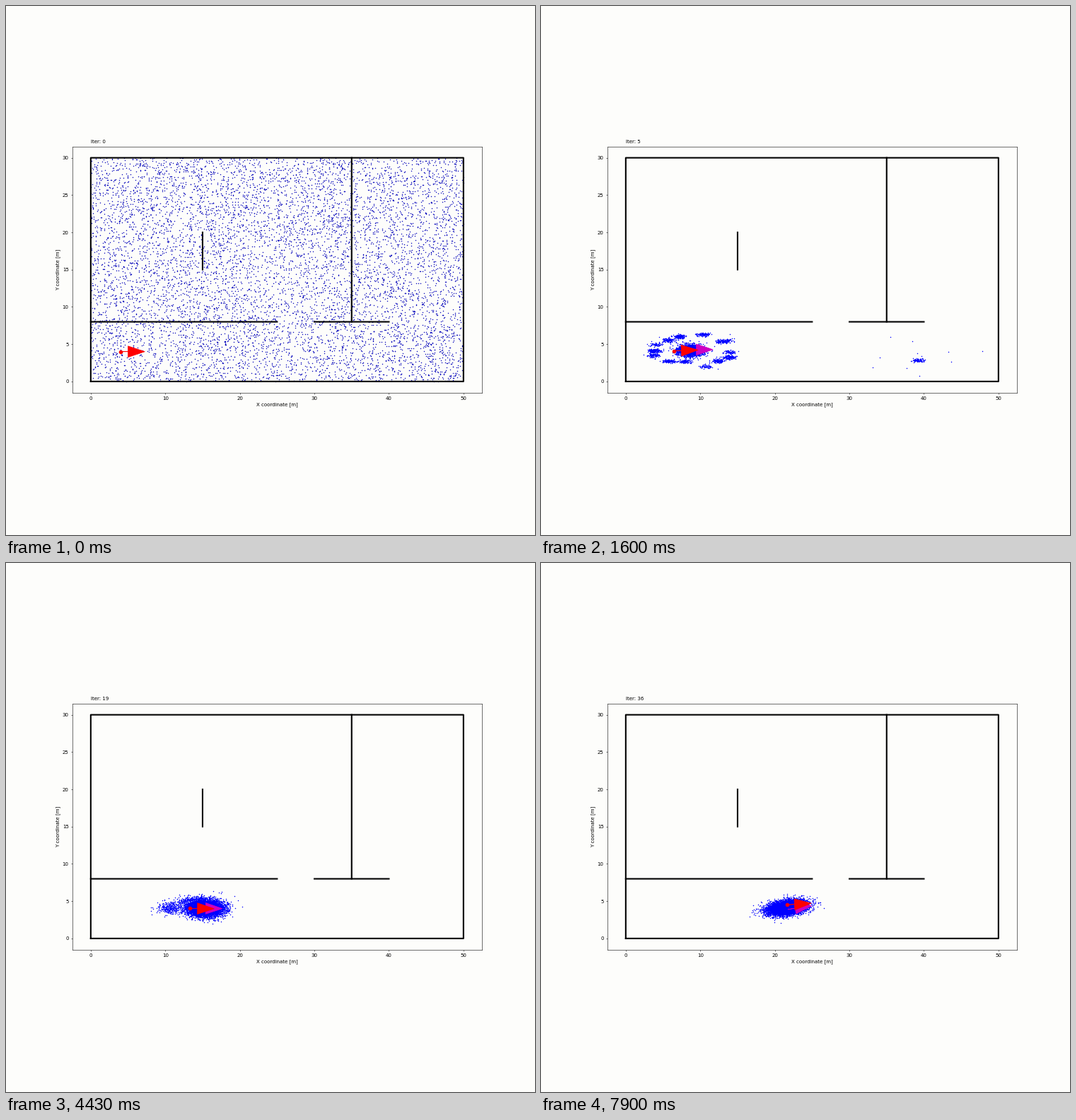
Recreate the animation shown at these times as a matplotlib script. Size 748 by 748 pixels, loop 8 s.

```python
import numpy as np
import matplotlib.pyplot as plt
from matplotlib.animation import FuncAnimation

SIZE, DPI = 748, 50
BG = "#fdfdfb"
STEP_MS, HOLD, STEPS = 200, 3, 40
LAST = STEPS - HOLD - 1
SPEED = .49
COUNT = 8500
RINGED = 14


def bell(v, mid, width):
    return np.exp(-((v - mid) / width) ** 2)


def inside(points):
    x, y = points.T
    return points[(x > .1) & (x < 49.9) & (y > .1) & (y < 29.9)]


def blob(rng, x, y, sx, sy, count):
    return rng.normal((x, y), (sx, sy), (max(int(count), 0), 2))


def robot(step):
    """Position and heading along a gently rising, swaying path."""
    w = 2 * np.pi / 30
    y = 4 + .4 * (step / LAST) ** 2 + .12 * np.sin(w * step)
    slope = (.8 * step / LAST ** 2 + .12 * w * np.cos(w * step)) / SPEED
    return 4 + SPEED * step, y, np.arctan(slope) if step else 0


def dip(step):
    return bell(step, 24, 4)


def cloud_center(step):
    lead = 2.2 - 2.3 * (step / LAST) ** 4
    return 4 + SPEED * step + lead, 4.15 - .45 * dip(step)


def guess(step):
    u = step / LAST
    lead = np.interp(step, [1, 5, 14, 24, 31, 36], [6.6, 2, .5, 1.7, 1.2, .1])
    y = cloud_center(step)[1] - .25 * u ** 4 + .9 * np.exp(-(step - 1) / 2)
    return 4 + SPEED * step + lead, y, .15 * u ** 3 - .15 * dip(step)


def likelihood(x, y):
    """How well a place fits the first measurement."""
    corridor = bell(y, 4.2, 2.7) * (1.3 * np.exp(-x / 12) + .7 * bell(x, 42, 5.5))
    left_room = .18 * np.exp(-x / 5)
    right_room = .45 * bell(x, 43.8, 3.5) * bell(y, 25.6, 3) + .02 * (x > 36)
    behind_wall = .12 * bell(x, 32.5, 1.8)
    return np.where(y < 7.7, corridor, left_room + right_room + behind_wall) + .005


def start_cloud():
    return np.random.default_rng(7).uniform((0, 0), (50, 30), (COUNT, 2))


def scattered(step):
    """Survivors of the first measurement, thinned and copied at each step."""
    rng = np.random.default_rng(11)
    points = start_cloud()
    points = points[rng.random(COUNT) < likelihood(*points.T)]
    points = points[rng.random(len(points)) < .33 ** (step - 1)]
    points = points + (SPEED * step, 0)
    copies = rng.poisson(.5 + 1.5 * (step - 1), len(points)) + 1
    points = np.repeat(points, copies, axis=0)
    spread = (.03 + .1 * (step - 1), .03 + .03 * (step - 1))
    return points + rng.normal(0, spread, points.shape)


def ring(rng, step):
    """Flat clumps around the main cloud; those behind grow, the rest fade."""
    shape = np.random.default_rng(4)
    angles = 2 * np.pi * np.arange(RINGED) / RINGED
    xs = 9 + 5.2 * np.cos(angles) + shape.normal(0, .4, RINGED)
    ys = 4.25 + 1.9 * np.sin(angles) + shape.normal(0, .2, RINGED)
    sizes = shape.uniform(30, 170, RINGED)
    age = step - 5
    later = max(age, 0)
    present = np.clip((step - 1) / 4, 0, 1) * np.clip((20 - step) / 6, 0, 1)
    grow = max(1 + .09 * age, .4)
    parts = []
    for x, y, size in zip(xs, ys, sizes):
        trend = 1 + .3 * later if x < 7.5 and y > 3.5 else 1 - later / 9
        y += .03 * later * (4.2 - y)
        parts.append(blob(rng, x + SPEED * age, y, .42 * grow, .13 * grow,
                          size * trend * present))
    return np.vstack(parts)


def particles(step):
    if step == 0:
        return start_cloud()
    if step == 1:
        return inside(scattered(1))
    rng = np.random.default_rng(100 + step)
    x, y = cloud_center(step)
    sx = 1.28 - .48 * np.exp(-max(step - 5, 0) / 7)
    sy = .46 + .37 * dip(step) - .1 * (step < 8)
    count = np.interp(step, [1, 5, 14, 24], [0, 2500, 4800, 7000])
    main = blob(rng, x, y, sx, sy, count)
    main[:, 1] += .12 * (step / LAST) ** 4 * (main[:, 0] - x)
    parts = [main, ring(rng, step),
             blob(rng, x + 1, 4.3, 3, 1.1, 45 - 2.5 * step),
             blob(rng, 40, 3, 4, 1.1, 3 * (9 - step)),
             blob(rng, 36.8 + SPEED * step, 2.85, .4, .12, 20 * (9 - step))]
    if step < 5:
        parts.append(scattered(step))
    return inside(np.vstack(parts))


def draw_arrow(x, y, angle, color, z):
    return ax.arrow(x, y, np.cos(angle), np.sin(angle), head_width=1.5,
                    color=color, zorder=z)


fig = plt.figure(figsize=(SIZE / DPI, SIZE / DPI), dpi=DPI, facecolor=BG)
ax = fig.add_axes([93.5 / SIZE, 201.3 / SIZE, 579.7 / SIZE, 347.9 / SIZE],
                  facecolor=BG)
ax.set(xlim=(-2.5, 52.5), ylim=(-1.5, 31.5),
       xlabel="X coordinate [m]", ylabel="Y coordinate [m]")

dots, = ax.plot([], [], "o", ms=2.1, mew=0, zorder=2)
walls = [((0, 50, 50, 0, 0), (0, 0, 30, 30, 0)), ((0, 25), (8, 8)),
         ((30, 40), (8, 8)), ((35, 35), (8, 30)), ((15, 15), (15, 20))]
for xs, ys in walls:
    ax.plot(xs, ys, "k", lw=3, snap=False, zorder=3)
body, = ax.plot([], [], "o", color="red", ms=8, mew=0, zorder=6)
label = ax.text(0, 32, "")
arrows = []


def update(frame):
    step = max(0, frame - HOLD)
    while arrows:
        arrows.pop().remove()
    dots.set_data(*particles(step).T)
    # Lone dots look darker than the dense cloud.
    dots.set_color("#0c0cbe" if step < 2 else "blue")
    x, y, heading = robot(step)
    body.set_data([x], [y])
    if step:
        arrows.append(draw_arrow(*guess(step), "#cf00c2", 4))
    arrows.append(draw_arrow(x, y, heading, "red", 5))
    label.set_text(f"Iter: {step}")
    return [dots, body, label, *arrows]


anim = FuncAnimation(fig, update, frames=STEPS, init_func=lambda: update(0),
                     interval=STEP_MS, repeat=True, repeat_delay=0, blit=False)
plt.show()
```
